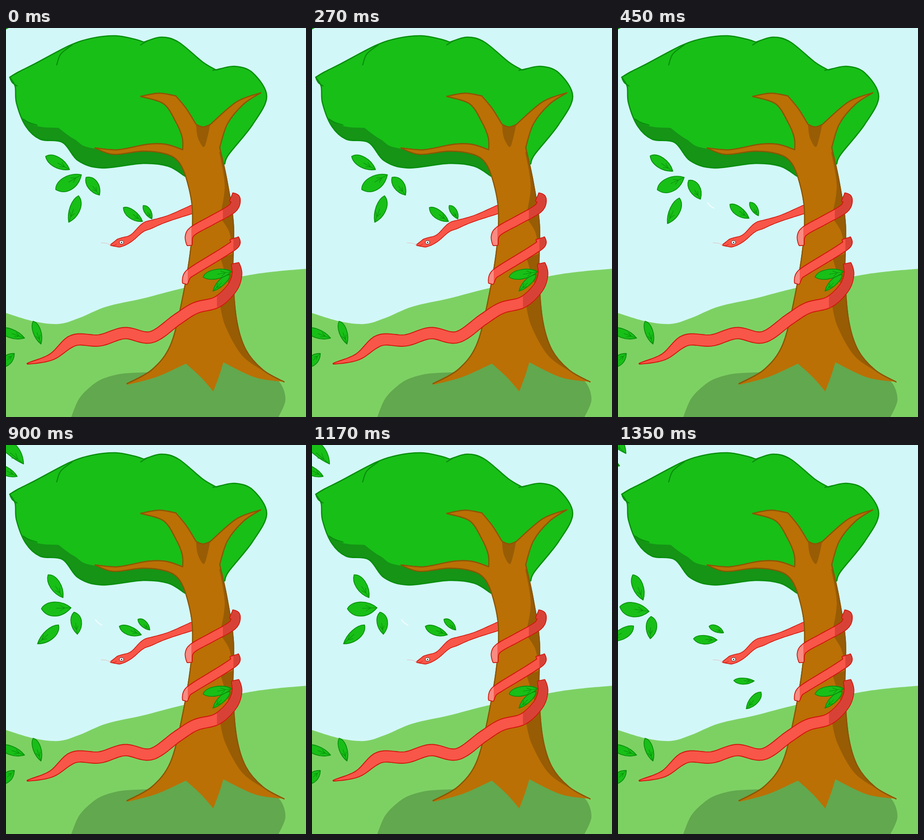
These frames come from a looping animation (657x853 px, 1.8 s). An HTML page with a canvas:

```html
<!DOCTYPE html>
<html lang="en">
<head>
<meta charset="utf-8">
<title>Snake in a windy tree</title>
<style>
html, body { margin: 0; width: 100%; height: 100%; overflow: hidden; background: #d2f7f8; }
canvas { display: block; }
</style>
</head>
<body>
<canvas id="stage" width="657" height="853"></canvas>
<script>
const ctx = document.getElementById('stage').getContext('2d');
const STEP = 450, POSES = 4;

const color = {
  sky: '#d2f7f8', hill: '#7dd163', shadow: '#62a84e',
  leaf: '#18bf17', leafEdge: '#078d0b', leafDark: '#159416',
  bark: '#ba7005', barkEdge: '#8b5503', barkDark: '#985c04',
  snake: '#f75648', snakeEdge: '#d0140c', snakeDark: '#d84236', snakePale: '#f98b82'
};

const points = text => text.trim().split(/\s+/).map(p => p.split(',').map(Number));

// Smooth curve through key points; a slash marks a sharp corner.
function spline(text, closed) {
  const path = new Path2D();
  let last = null;
  for (const part of text.split('/')) {
    const pts = points(part);
    if (last) pts.unshift(last);
    else path.moveTo(...pts[0]);
    for (let i = 0; i < pts.length - 1; i++) {
      const a = pts[i], b = pts[i + 1];
      const p = pts[i - 1] || a, n = pts[i + 2] || b;
      path.bezierCurveTo(a[0] + (b[0] - p[0]) / 6, a[1] + (b[1] - p[1]) / 6,
        b[0] - (n[0] - a[0]) / 6, b[1] - (n[1] - a[1]) / 6, b[0], b[1]);
    }
    last = pts[pts.length - 1];
  }
  if (closed) path.closePath();
  return path;
}

// Band around a smooth centre line; width(t) runs from t = 0 to 1.
function ribbon(text, width) {
  const pts = points(text), last = pts.length - 1, left = [], right = [];
  const at = t => {
    const i = Math.min(last - 1, Math.floor(t * last)), u = t * last - i;
    const b = pts[i], c = pts[i + 1], a = pts[i - 1] || b, d = pts[i + 2] || c;
    return [0, 1].map(k => b[k] + u * ((c[k] - a[k]) / 2
      + u * (a[k] - 2.5 * b[k] + 2 * c[k] - d[k] / 2
      + u * (1.5 * (b[k] - c[k]) + (d[k] - a[k]) / 2))));
  };
  for (let i = 0; i <= 100; i++) {
    const t = i / 100, [x, y] = at(t);
    const [x0, y0] = at(Math.max(0, t - .01)), [x1, y1] = at(Math.min(1, t + .01));
    const k = width(t) / 2 / Math.hypot(x1 - x0, y1 - y0);
    left.push([x + (y1 - y0) * k, y - (x1 - x0) * k]);
    right.unshift([x - (y1 - y0) * k, y + (x1 - x0) * k]);
  }
  const path = new Path2D();
  left.concat(right).forEach(p => path.lineTo(...p));
  path.closePath();
  return path;
}

function fill(path, style) {
  ctx.fillStyle = style;
  ctx.fill(path);
}

function stroke(path, style, width) {
  ctx.strokeStyle = style;
  ctx.lineWidth = width;
  ctx.stroke(path);
}

function within(mask, draw) {
  ctx.save();
  ctx.clip(mask);
  draw();
  ctx.restore();
}

// Scenery
const hill = spline(`0,625 60,643 115,649 160,636 220,611 300,593 390,570 515,545 580,535 657,528
  / 657,853 / 0,853`, true);
const shade = spline(`143,853 160,813 188,784 215,768 255,758 310,755 / 400,730 / 480,730 / 570,762
  600,778 612,815 597,853`, true);

const crown = spline(`8,108 28,96 62,79 140,38 190,22 240,17 280,24 302,31 / 340,20 378,31 430,74 460,92
  / 500,84 540,98 571,150 540,212 488,277 479,298 / 392,325 / 355,303 300,297 210,307 158,291 124,251
  75,244 43,215 23,165 20,128 8,108`, true);
const crownShade = spline('30,194 68,215 115,219 / 150,244 200,265 390,270 / 400,340 / 20,340', true);
const crownLines = ['111,81 120,57 145,37', '295,37 308,29', '453,93 470,89', '9,111 14,120 24,127',
  '38,200 50,207 68,213'].map(t => spline(t));

const trunkEdge = `265,780 320,749 360,696 385,600 405,480 408,395 395,330 378,293 350,276 300,270 235,277 195,263
  / 245,267 310,255 350,255 387,267 / 386,240 372,206 345,166 295,150 / 335,143 372,149 / 395,177 416,211
  / 431,217 447,212 / 505,162 558,142 / 520,167 485,210 468,262 / 484,335 498,430 497,540 505,640 525,705
  563,750 609,776`;
const trunk = spline(trunkEdge + '/ 545,766 476,733 / 467,762 454,797 / 427,766 394,736 / 330,765 267,782', true);
const trunkLine = spline(trunkEdge);
const trunkShades = [
  '467,272 479,345 470,408 / 510,408 / 510,272',
  '470,417 488,445 495,475 / 510,400',
  '470,505 490,570 / 510,570 / 510,490',
  '468,604 481,655 517,718 565,753 / 620,750 / 510,580',
  '416,211 420,240 433,261 441,240 447,212'
].map(t => spline(t, true));

// Snake, from the back loop up to the head
const headWidth = t => Math.min(1, 8 * t) * (14 + 3 * Math.cos(15 * (t - .17)));
const coilWidth = t => 18 - 9 * t ** 6;
const tailWidth = t => Math.min(1, 6 * t) * (23 - 8 * t ** 8);
const neck = ribbon('229,476 252,470 275,460 300,438 322,429 365,414 412,396', headWidth);
const coils = [
  [ribbon('494,371 503,376 495,396 450,422 412,443 401,457 402,476', coilWidth), 475, 406],
  [ribbon('500,462 502,473 482,488 448,509 412,531 397,543 392,560', coilWidth), 498, 398],
  [ribbon(`47,736 100,721 148,685 205,685 260,669 318,678 375,639 415,614 462,601 495,570 506,540
    502,517`, tailWidth), 462, 0]
];

// Leaf around its middle; up and down are side bulges as parts of the length.
function leaf([x, y, size, angle, up, down]) {
  ctx.save();
  ctx.translate(x, y);
  ctx.rotate(angle * Math.PI / 180);
  const at = (u, v) => [(u - .5) * size, v * size];
  const path = new Path2D(), veins = new Path2D();
  path.moveTo(...at(0, 0));
  path.bezierCurveTo(...at(.15, -1.35 * up), ...at(.68, -1.35 * up), ...at(1, 0));
  path.bezierCurveTo(...at(.68, 1.35 * down), ...at(.2, 1.35 * down), ...at(0, 0));
  fill(path, color.leaf);
  stroke(path, color.leafEdge, 1.6);
  for (const [u, v] of [[.5, 0], [.63, -.09], [.63, .09]]) {
    veins.moveTo(...at(v ? .79 : .98, 0));
    veins.lineTo(...at(u, v));
  }
  stroke(veins, color.leafEdge, 1);
  ctx.restore();
}

const resting = [
  [472, 559, 52, 136, .12, .15], [463, 540, 64, -11, .17, .15],
  [13, 670, 59, 20, .15, .17], [68, 668, 53, 71, .17, .15], [3, 728, 42, -43, .24, .24]
];

// Each swarm moves as one stiff group: x, y and turn for every pose.
const swarms = [
  {
    leaves: [[-34, -48, 60, 29, .2, .18], [-10, -6, 65, -30, .21, .26],
      [43, 3, 49, 53, .27, .2], [1, 53, 62, 110, .22, .14]],
    poses: [[147, 344, 0], [125, 348, 5], [116, 368, 28], [40, 371, 39]]
  },
  {
    leaves: [[-16, 3, 52, 36, .16, .2], [16, -2, 35, 57, .23, .16]],
    poses: [[294, 406, 0], [282, 399, 0], [287, 400, -15], [203, 415, -33]]
  },
  {
    leaves: [[9, 17, 77, 40, .27, .07], [2, 57, 51, 28, .15, .2]],
    poses: [null, null, [0, 0, 0], [-21, -23, 0]]
  },
  {
    leaves: [[276, 517, 45, 1, .13, .17], [297, 560, 49, 131, .2, .17]],
    poses: [null, null, null, [0, 0, 0]]
  }
];

function drawSwarm({ leaves, poses }, pose) {
  if (!poses[pose]) return;
  const [x, y, turn] = poses[pose];
  ctx.save();
  ctx.translate(x, y);
  ctx.rotate(turn * Math.PI / 180);
  leaves.forEach(leaf);
  ctx.restore();
}

function drawCrown() {
  fill(crown, color.leaf);
  within(crown, () => fill(crownShade, color.leafDark));
  stroke(crown, color.leafEdge, 2.6);
  crownLines.forEach(l => stroke(l, color.leafEdge, 2.3));
}

function drawHead() {
  stroke(neck, color.snakeEdge, 3);
  fill(neck, color.snake);
  stroke(spline('231,477 237,477 242,474'), color.snakeEdge, 1);
  stroke(spline('229,476 220,472 208,471'), '#e3c6c8', 1.2);
  const eye = new Path2D();
  eye.ellipse(253, 470, 4.8, 4, 0, 0, 7);
  fill(eye, '#fff');
  stroke(eye, '#33211f', 1);
  ctx.fillStyle = '#111';
  ctx.fillRect(252, 469, 2.4, 2.4);
}

function drawTrunk() {
  stroke(trunkLine, color.barkEdge, 2.4);
  fill(trunk, color.bark);
  within(trunk, () => trunkShades.forEach(s => fill(s, color.barkDark)));
  stroke(trunkLine, color.barkEdge, 2.4);
}

function drawCoil([body, darkFrom, paleTo]) {
  stroke(body, color.snakeEdge, 3.8);
  fill(body, color.snake);
  within(body, () => {
    ctx.fillStyle = color.snakeDark;
    ctx.fillRect(darkFrom, 0, 657, 853);
    ctx.fillStyle = color.snakePale;
    ctx.fillRect(0, 0, paleTo, 853);
  });
}

function drawScene(pose) {
  ctx.fillStyle = color.sky;
  ctx.fillRect(0, 0, 657, 853);
  fill(hill, color.hill);
  fill(shade, color.shadow);
  drawCrown();
  drawHead();
  drawTrunk();
  coils.forEach(drawCoil);
  resting.forEach(leaf);

  if (pose === 1 || pose === 2) stroke(spline('196,383 202,390 210,395'), '#f7fdfd', 2);
  if (pose < 2) stroke(spline('-1,2 5,-1'), color.leafEdge, 3);
  swarms.forEach(s => drawSwarm(s, pose));
}

ctx.lineJoin = ctx.lineCap = 'round';
let shown = -1;
function tick() {
  const pose = Math.floor(performance.now() / STEP) % POSES;
  if (pose !== shown) drawScene(shown = pose);
  requestAnimationFrame(tick);
}
tick();
</script>
</body>
</html>
```
